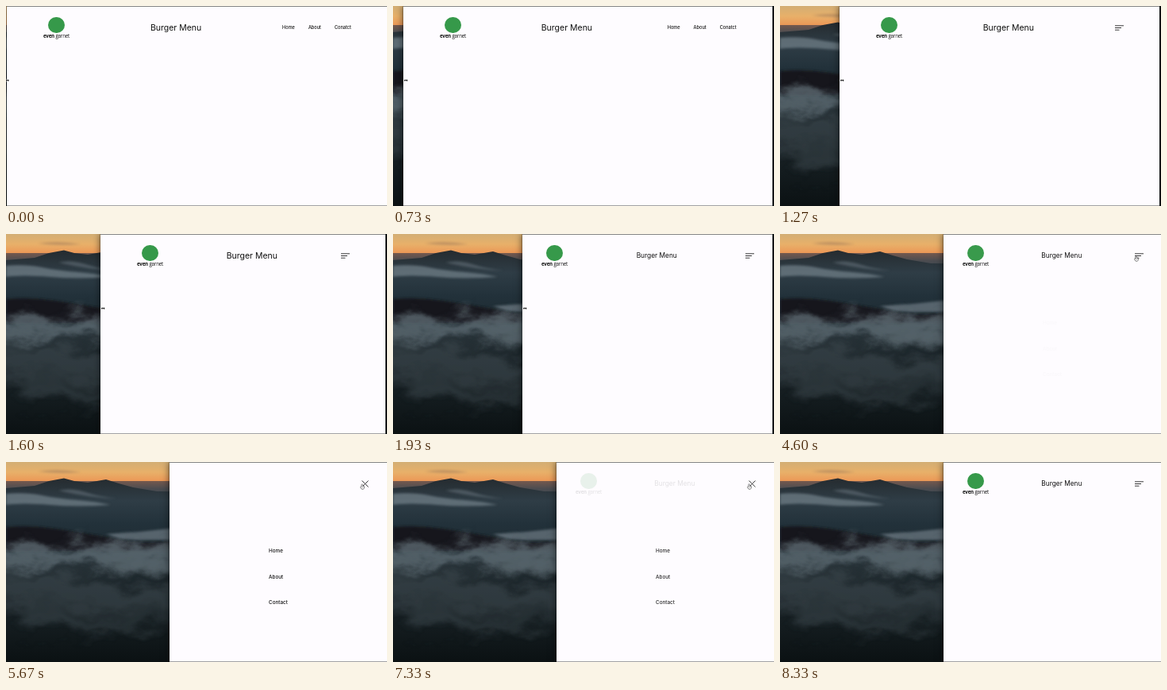
Animation of 480x252 px, one loop 8.54 s. Source, as an HTML page:

```html
<!DOCTYPE html>
<html lang="en">
<head>
<meta charset="utf-8">
<title>Burger Menu</title>
<style>
  html, body { margin: 0; width: 100%; height: 100%; overflow: hidden; background: #14191c; }
  #stage { position: relative; width: 480px; height: 252px; overflow: hidden; font-family: Inter, sans-serif; color: #111; }
  #photo { position: absolute; inset: 0; }
  #win {
    position: absolute; top: 0; bottom: 0; box-sizing: border-box;
    background: #fefcff; border-top: 1px solid #858585; border-bottom: 1px solid #a2a2a4;
    box-shadow: 0 0 9px rgba(0, 0, 0, .65), 0 0 1px #000;
    container-type: inline-size;
  }
  header {
    position: absolute; top: 0; left: 0; right: 0; height: 52px; padding: 0 45px 0 46px;
    display: flex; justify-content: space-between; align-items: center;
  }
  .logo { position: relative; width: 33px; height: 27px; }
  .logo i { position: absolute; left: 6px; top: 0; width: 20.5px; height: 20.5px; border-radius: 50%; background: #36994a; }
  .logo span {
    position: absolute; top: 20px; left: -4px; width: 41px; text-align: center; white-space: nowrap;
    font: 6.2px/8px "Open Sans", sans-serif; letter-spacing: -.2px;
  }
  h1 { margin: 0; font-size: 10.5px; font-weight: 400; white-space: nowrap; }
  nav { display: flex; gap: 17px; font-size: 5.6px; font-weight: 500; }
  .burger { display: none; width: 11px; height: 7px; }
  .burger path, .close path { fill: none; stroke: #222; stroke-width: .9; }
  @container (max-width: 418px) {
    nav { display: none; }
    .burger { display: block; }
  }
  @container (max-width: 348px) {
    header { padding: 0 22.3px 0 24px; }
    h1 { font-size: 8.35px; }
  }
  #menu {
    position: absolute; inset: 0; opacity: 0; background: #fefcff;
    display: flex; justify-content: center; font-size: 6.35px; font-weight: 500; line-height: 32.4px;
  }
  #menu div { margin-top: 95.4px; }
  .close { position: absolute; top: 21.5px; right: 23px; }
  #cursors { position: absolute; inset: 0; }
  #cursors g { fill: #111; stroke: #fff; stroke-width: .5; paint-order: stroke; }
  #cursors #hand { fill: #ddd; stroke: #222; stroke-width: .8; }
</style>
</head>
<body>
<div id="stage">
  <svg id="photo" width="480" height="252">
    <defs>
      <linearGradient id="sky" x2="0" y2="1">
        <stop offset="0" stop-color="#d3ae74"/><stop offset=".5" stop-color="#e8b069"/><stop offset="1" stop-color="#ec9353"/>
      </linearGradient>
      <linearGradient id="haze" x2="0" y2="1">
        <stop offset="0" stop-color="#75594e"/><stop offset=".4" stop-color="#4c4c50"/><stop offset="1" stop-color="#34444e"/>
      </linearGradient>
      <linearGradient id="land" x2="0" y2="1">
        <stop offset="0" stop-color="#252b2f"/><stop offset=".12" stop-color="#2f3d46"/><stop offset=".25" stop-color="#22313a"/>
        <stop offset=".5" stop-color="#1d272c"/><stop offset=".8" stop-color="#141c1f"/><stop offset="1" stop-color="#0b1113"/>
      </linearGradient>
      <filter id="soft" x="-30%" y="-60%" width="160%" height="220%">
        <feGaussianBlur stdDeviation="7" result="mist"/>
        <feTurbulence type="fractalNoise" baseFrequency=".025 .04" numOctaves="4" seed="4"/>
        <feDisplacementMap in="mist" scale="45" xChannelSelector="R" yChannelSelector="G"/>
      </filter>
      <filter id="fine" x="-30%" y="-60%" width="160%" height="220%"><feGaussianBlur stdDeviation="1.6"/></filter>
    </defs>
    <rect width="480" height="26" fill="url(#sky)"/>
    <path fill="#a0795a" opacity=".6" filter="url(#fine)" d="M40 12Q65 8 95 13Q65 15 40 12Z"/>
    <rect y="24" width="480" height="24" fill="url(#haze)"/>
    <path fill="url(#land)" d="M0 33L36 30L54 24L73 20.5L86 24L103 26L126 22L142 27L160 32L190 37L480 40V252H0Z"/>
    <g fill="#74828a" filter="url(#fine)">
      <path opacity=".7" d="M0 40Q25 38 45 42T90 48T132 54Q90 57 55 54T0 54Z"/>
      <path opacity=".45" d="M66 36Q82 32 100 38T140 46Q110 46 66 36Z"/>
      <path opacity=".65" d="M126 91Q165 89 205 84H480V98H206Q170 99 145 97Z"/>
    </g>
    <path fill="#13191d" filter="url(#fine)" d="M0 82Q30 79 62 84T112 92T150 99T210 100H480V112H0Z"/>
    <g fill="#66737b" filter="url(#soft)">
      <path opacity=".75" d="M-40 120Q35 103 72 106T130 104T250 108V128Q150 142 105 132T-40 146Z"/>
      <path opacity=".3" d="M-40 150Q60 132 110 150T250 150V182Q150 200 100 186T-40 180Z"/>
      <path opacity=".28" d="M20 185Q60 172 90 190T250 186Q150 222 95 213T20 212Z"/>
    </g>
    <rect x="476" width="4" height="252" fill="#171d20"/>
  </svg>

  <div id="win">
    <header>
      <div class="logo"><i></i><span><b>even</b> garnet</span></div>
      <h1>Burger Menu</h1>
      <nav><span>Home</span><span>About</span><span>Conatct</span></nav>
      <svg class="burger"><path d="M0 .8H11M0 3.5H8M0 6.2H5.5"/></svg>
    </header>
    <div id="menu">
      <div>Home<br>About<br>Contact</div>
      <svg class="close" width="9" height="9"><path d="M.5 .5L8.5 8.5M8.5 .5L.5 8.5"/></svg>
    </div>
  </div>

  <svg id="cursors" width="480" height="252">
    <g id="resize"><path d="M-2.4 0L-.8 -1.5V-.4H.8V-1.5L2.4 0L.8 1.5V.4H-.8V1.5Z"/></g>
    <g id="arrow"><path d="M0 0V5L1.2 4L2 5.8L2.8 5.4L2 3.7H3.5Z"/></g>
    <g id="hand"><path d="M-.9 -2.8H0V-.8L2.2 -.3V1.6L1.5 3H-1L-2.4 .6L-1.7 0L-.9 .7Z"/></g>
  </svg>
</div>

<script>
const LOOP = 8540, STEP = 1000 / 15;
const $ = id => document.getElementById(id);
const clamp = v => Math.min(1, Math.max(0, v));
const ease = v => v * v * (3 - 2 * v);

// Piecewise linear track of [time, ...values]
function track(points, t) {
  const next = points.findIndex(p => p[0] > t);
  if (next < 0) return points.at(-1).slice(1);
  if (next === 0) return points[0].slice(1);
  const a = points[next - 1], b = points[next];
  const k = (t - a[0]) / (b[0] - a[0]);
  return a.slice(1).map((v, i) => v + (b[i + 1] - v) * k);
}

const EDGE = [[533, 1], [600, 3], [733, 13], [1267, 75], [1933, 163], [2267, 199], [2400, 206]];
const POINTER = [
  [3067, 207, 95], [3133, 208, 95], [3267, 208, 95], [3400, 265, 84], [3533, 375, 58], [3600, 404, 50],
  [3733, 404, 50], [3933, 430, 38], [4133, 445, 32], [4333, 449, 31],
  [8000, 449, 31], [8133, 440, 18], [8267, 425, 3], [8333, 418, -12]
];

function place(id, shown, x, y) {
  const g = $(id);
  g.style.display = shown ? "" : "none";
  g.setAttribute("transform", `translate(${x} ${y})`);
}

function draw(now) {
  const t = Math.floor((now % LOOP + 4) / STEP) * STEP + 1;
  const edge = Math.round(track(EDGE, t)[0]);
  const resizing = t >= 600 && t < 2400;
  const right = resizing ? 477.7 : 480;
  $("win").style.left = edge + "px";
  $("win").style.width = right - edge + "px";

  const opened = ease(clamp((t - 4533) / 1100));
  const closed = ease(clamp((t - 7267) / 330));
  $("menu").style.opacity = opened * (1 - closed);

  const [x, y] = track(POINTER, t);
  const onButton = t > 4130 && t < 8060;
  place("resize", t < 3060, edge < 3 ? 1.5 : edge + 3.2, 93.7);
  place("arrow", t > 3060 && !onButton && t < 8330, x, y);
  place("hand", onButton, x, y);
}

function loop() {
  draw(performance.now());
  requestAnimationFrame(loop);
}
loop();
</script>
</body>
</html>
```
